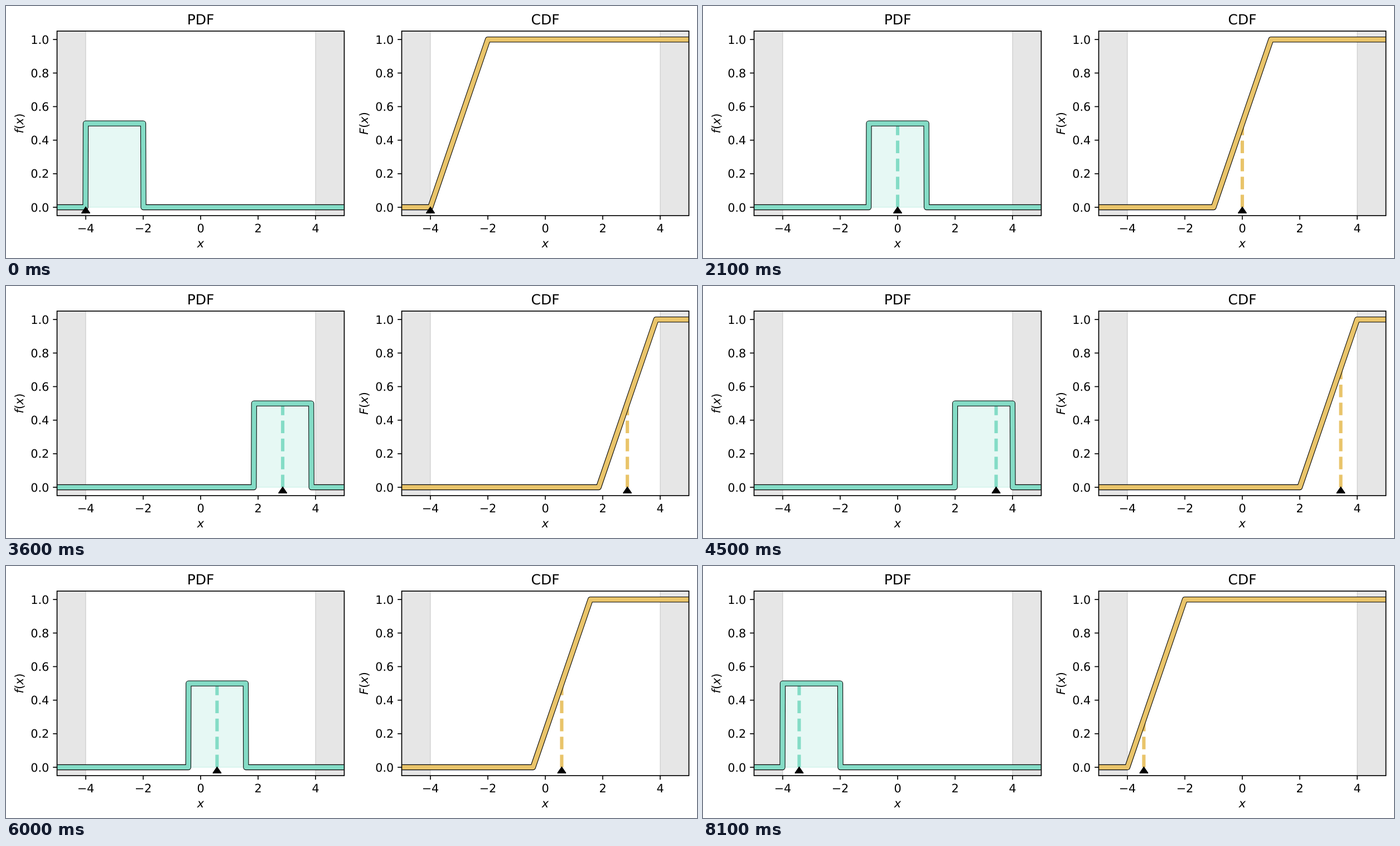
An HTML page that plays this animation: 1239x452 px, repeating every 8.4 s.

```html
<!DOCTYPE html>
<html lang="en">
<head>
<meta charset="utf-8">
<title>Moving uniform distribution</title>
<style>
  html, body { margin: 0; width: 100%; height: 100%; overflow: hidden; background: #fff; }
  svg { display: block; width: 1239px; height: 452px; }
  text { font-family: "DejaVu Sans", sans-serif; font-size: 20.8px; text-rendering: geometricPrecision; }
  .title { font-size: 25px; }
  .it { font-style: italic; }
  .mid { text-anchor: middle; }
  .end { text-anchor: end; }
</style>
</head>
<body>
<svg id="stage" viewBox="0 0 1239 452"></svg>
<script>
const NS = "http://www.w3.org/2000/svg";
const LEFT = 91.5, RIGHT = 606.5, TOP = 45, BOTTOM = 376;
const STEP = 300, FRAMES = 28, GRID = 0.01;
const stage = document.getElementById("stage");

const px = x => 349 + 51.5 * x;
const py = y => 361 - 300.9 * y;
const clamp = (v, a, b) => Math.min(b, Math.max(a, v));
const line = pts => "M" + pts.map(([x, y]) => px(x).toFixed(2) + " " + py(y).toFixed(2)).join("L");

function add(parent, tag, attrs, text) {
  const el = document.createElementNS(NS, tag);
  for (const k in attrs) el.setAttribute(k, attrs[k]);
  if (text !== undefined) el.textContent = text;
  parent.appendChild(el);
  return el;
}

const box = { x: LEFT, y: TOP, width: RIGHT - LEFT, height: BOTTOM - TOP };
add(add(stage, "clipPath", { id: "axes" }), "rect", box);

function makePanel(shift, title, letter, color) {
  const g = add(stage, "g", { transform: `translate(${shift} 0)` });
  const plot = add(g, "g", { "clip-path": "url(#axes)" });

  for (const x of [-5, 4]) {
    add(plot, "rect", {
      x: px(x), y: TOP, width: 51.5, height: BOTTOM - TOP, fill: "#808080", stroke: "#808080",
      "fill-opacity": 0.2, "stroke-opacity": 0.2, "stroke-width": 2
    });
  }

  const area = add(plot, "path", {
    fill: color, stroke: color, "fill-opacity": 0.2, "stroke-opacity": 0.2, "stroke-width": 2
  });
  const stem = add(plot, "path", { stroke: color, "stroke-width": 6.1, "stroke-dasharray": "22.55 9.75" });
  const curve = [["#000", 10.3], [color, 8.2]].map(([stroke, width]) => add(plot, "path", {
    fill: "none", stroke, "stroke-width": width, "stroke-linejoin": "round"
  }));
  const marker = add(plot, "path", { d: "M-7.3 10.9L0 0L7.3 10.9", stroke: "#000", "stroke-width": 2.08 });

  const ticks = { stroke: "#000", "stroke-width": 1.67 };
  for (let x = -4; x <= 4; x += 2) {
    add(g, "path", { d: `M${px(x)} ${BOTTOM}v7.3`, ...ticks });
    add(g, "text", { class: "mid", x: px(x), y: 406.2 }, String(x).replace("-", "\u2212"));
  }
  for (let i = 0; i <= 5; i++) {
    const y = py(i / 5);
    add(g, "path", { d: `M${LEFT} ${y}h-7.3`, ...ticks });
    add(g, "text", { class: "end", x: 77.3, y: y + 7.5 }, (i / 5).toFixed(1));
  }
  add(g, "rect", { ...box, fill: "none", ...ticks });

  add(g, "text", { class: "mid title", x: 349, y: 33 }, title);
  add(g, "text", { class: "mid it", x: 349, y: 433.3 }, "x");
  const label = add(g, "text", { class: "mid", transform: "translate(30.7 210.5) rotate(-90)" });
  add(label, "tspan", { class: "it" }, letter);
  add(label, "tspan", {}, "(");
  add(label, "tspan", { class: "it" }, "x");
  add(label, "tspan", {}, ")");

  return (pts, x, height, fill) => {
    const d = line(pts);
    curve.forEach(c => c.setAttribute("d", d));
    area.setAttribute("d", fill ? line(fill) + "Z" : "");
    stem.setAttribute("d", line([[x, 0], [x, height]]));
    marker.setAttribute("transform", `translate(${px(x)} ${py(0)})`);
  };
}

const drawPdf = makePanel(0, "PDF", "f", "#84dcc6");
const drawCdf = makePanel(618, "CDF", "F", "#e9c46a");

function render(time) {
  const k = Math.floor(time / STEP) % FRAMES;
  const x = 4 - Math.abs(k - FRAMES / 2) * 4 / 7;
  const lo = clamp(x - 1, -4, 2), hi = lo + 2;

  // The density jumps between neighbouring sample points.
  const a = Math.ceil(lo / GRID - 1e-6) * GRID;
  const b = Math.floor(hi / GRID + 1e-6) * GRID;
  const bump = [[a - GRID, 0], [a, 0.5], [b, 0.5], [b + GRID, 0]];

  drawPdf([[-5, 0], ...bump, [5, 0]], x, 0.5, bump);
  drawCdf([[-5, 0], [lo, 0], [hi, 1], [5, 1]], x, (x - lo) / 2);
}

const start = performance.now();
function tick() {
  render(performance.now() - start);
  requestAnimationFrame(tick);
}
tick();
</script>
</body>
</html>
```
